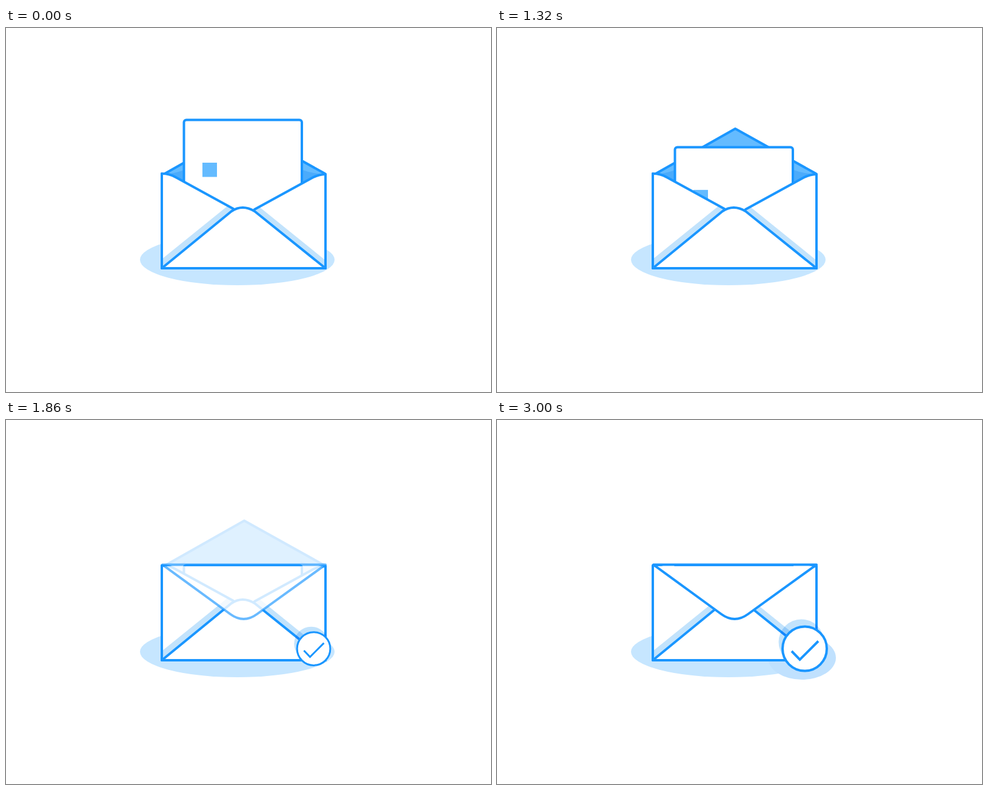
These frames come from a looping animation (800x600 px, 3060 ms). An HTML page:

```html
<!DOCTYPE html>
<html lang="en">
<head>
<meta charset="utf-8">
<title>Letter sent</title>
<style>
  html, body { margin: 0; width: 100%; height: 100%; overflow: hidden; background: #fff; }
  svg { display: block; width: 800px; height: 600px; }
  .line { fill: none; stroke: #1a96ff; stroke-width: 4; stroke-linejoin: round; stroke-linecap: round; }
  .paper { fill: #fff; }
  .shade { fill: #c2e3fc; }
</style>
</head>
<body>
<svg viewBox="0 0 800 600">
  <ellipse cx="381.5" cy="382" rx="160.5" ry="42" fill="#c6e6ff"/>
  <ellipse id="badgeGround" cx="503" cy="392" rx="56" ry="36" fill="#c0e1fe"/>

  <g id="openFlap">
    <path d="M262 240L393 166L526 240L393 300Z" fill="#64bbff"/>
    <path d="M264 241Q282 239 296 233V258ZM522 241Q502 239 486 233V258Z" fill="#4babfb"/>
    <path class="line" d="M262 240L393 166L526 240"/>
  </g>

  <g id="letter">
    <rect class="line paper" style="fill:#fff" x="293.5" y="151.5" width="194.5" height="153" rx="4"/>
    <rect x="324" y="222" width="24" height="23.5" fill="#64bbff"/>
    <path id="marks" d="M370 224.5h6M394 224.5h9M408 224.5h3M424 224.5h4" stroke="#e6f3ff"/>
  </g>

  <g id="body">
    <path class="paper" d="M257 240Q270 240 280 246L375 298L392 320L410 299L505 247Q514 242 527 241V396H257Z"/>
    <path class="shade" d="M257 381L366 293L376 299L257 396ZM527 383L418 295L409 300L527 396Z"/>
    <path class="paper" d="M257 396L372 302Q390 290 410 302L527 396Z"/>
    <path class="line" d="M257 240Q270 240 280 246L375 298M527 241Q514 242 505 247L410 299"/>
    <path class="line" d="M257 396L372 302Q390 290 410 302L527 396"/>
    <path class="line" d="M257 240V396H527V241"/>
  </g>

  <path id="flapFill" class="paper" d="M261 241H524L414 320Q392 336 370 320Z"/>
  <path id="flapLine" class="line" d="M258 238.5H527L414 320Q392 336 370 320Z"/>

  <g id="badge">
    <circle cx="502" cy="366" r="37.5" fill="#c2e3fc" style="mix-blend-mode:multiply"/>
    <circle class="line" style="fill:#fff" cx="507.5" cy="377" r="36.5"/>
    <path class="line" style="stroke-linecap:butt;stroke-linejoin:miter" d="M486 381L499.500 395L530 364.500"/>
  </g>
</svg>
<script>
const LOOP = 3060, STEP = 60;
const part = id => document.getElementById(id);
const [ground, openFlap, letter, marks, flapFill, flapLine, badge] =
  ['badgeGround', 'openFlap', 'letter', 'marks', 'flapFill', 'flapLine', 'badge'].map(part);

// Piecewise linear value through [time, value] pairs.
function track(t, keys) {
  if (t <= keys[0][0]) return keys[0][1];
  for (let i = 1; i < keys.length; i++) {
    const [a, u] = keys[i - 1], [b, v] = keys[i];
    if (t <= b) return u + (v - u) * (t - a) / (b - a);
  }
  return keys[keys.length - 1][1];
}

function draw(t) {
  const p = track(t, [[1140, 0], [1740, 1]]);
  const drop = 88 * (1 - (1 - p) ** 2);
  letter.setAttribute('transform', `translate(0 ${drop})`);
  marks.style.opacity = t >= 600 && t < 1140 ? 1 : 0;

  const shut = track(t, [[1560, 0], [1620, .07], [1740, .4], [1920, 1]]);
  openFlap.style.opacity = 1 - shut;
  flapFill.style.opacity = shut;
  flapLine.style.opacity = track(t, [[1560, 0], [1620, .05], [1740, .41], [1980, .9], [2040, 1]]);

  const size = track(t, [[1740, 0], [1860, .75], [1920, .97], [1980, 1.01], [2040, 1]]);
  badge.style.display = size ? '' : 'none';
  badge.setAttribute('transform', `translate(507.5 377) scale(${size}) translate(-507.5 -377)`);
  ground.style.opacity = track(t, [[1920, 0], [1980, .1], [2160, 1]]);
}

const start = performance.now();
function tick() {
  const t = Math.max(0, performance.now() - start) % LOOP;
  draw(Math.floor(t / STEP) * STEP);
  requestAnimationFrame(tick);
}
tick();
</script>
</body>
</html>
```
